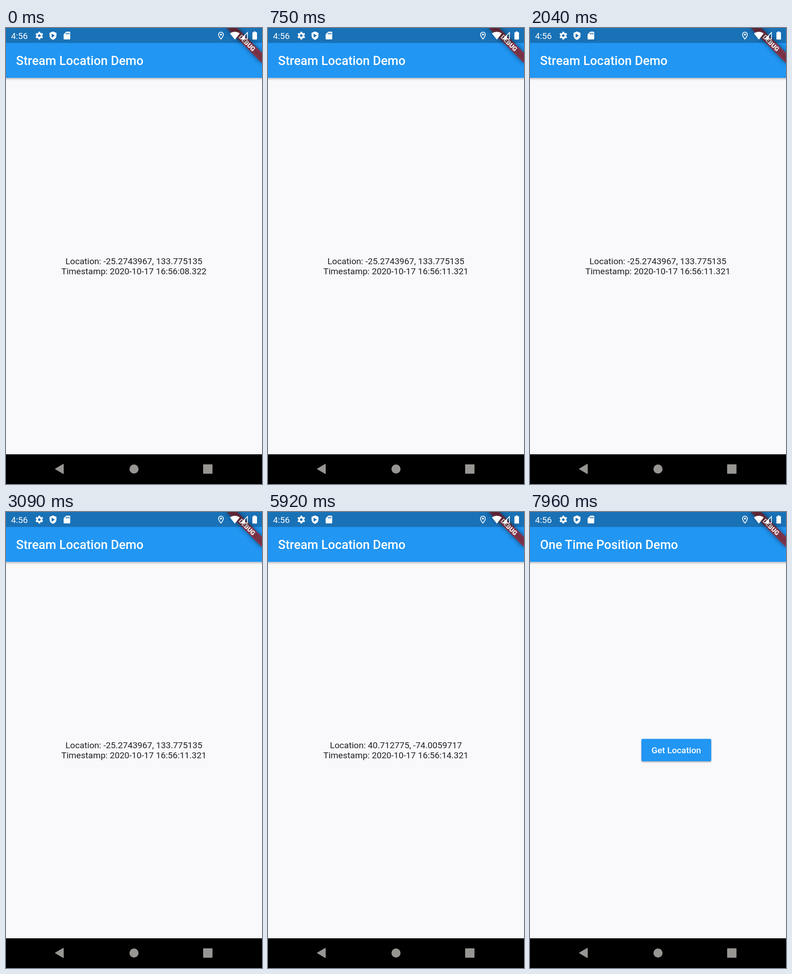
Write an HTML page that moves like this. It is 561 px wide and 998 px high and loops after 8000 ms.

```html
<!DOCTYPE html>
<html lang="en">
<head>
<meta charset="utf-8">
<title>Location demo</title>
<style>
  html, body { margin: 0; width: 100%; height: 100%; overflow: hidden; background: #f9f9fc; }
  svg { display: block; width: 561px; height: 998px; font-family: Roboto, sans-serif; }
  .body { font-size: 19.09px; fill: #212124; text-anchor: middle; }
  .title { font-size: 27.27px; font-weight: 500; fill: #fff; }
  .bar { filter: drop-shadow(0 2px 2.5px rgba(0, 0, 0, .3)); }
  .button { filter: drop-shadow(0 2px 1.5px rgba(0, 0, 0, .3)); }
</style>
</head>
<body>
<svg viewBox="0 0 561 998">
  <rect width="561" height="998" fill="#f9f9fc"/>

  <g id="pages">
    <g class="body">
      <text id="place" x="280.3" y="516.5"></text>
      <text id="stamp" x="280.3" y="538.5"></text>
    </g>
    <g transform="translate(561)">
      <rect class="button" x="204" y="496.5" width="153" height="49" rx="2.7" fill="#2196f3"/>
      <text class="body" x="280.5" y="527.5" style="fill:#fff;font-weight:500">Get Location</text>
    </g>
  </g>

  <rect class="bar" x="-10" y="-10" width="581" height="119" fill="#2196f3"/>
  <text id="title" class="title" x="22" y="81"></text>

  <!-- Corner ribbon -->
  <g transform="translate(561) rotate(45)">
    <rect x="-54.5" y="38.2" width="109" height="16.4" style="filter:blur(5.4px)" opacity=".5"/>
    <rect x="-54.5" y="38.2" width="109" height="16.4" fill="#b71c1c" fill-opacity=".63"/>
    <text y="51.3" font-size="13.9" font-weight="900" fill="#fff" text-anchor="middle">DEBUG</text>
  </g>

  <!-- Status bar -->
  <rect width="561" height="32.7" opacity=".25"/>
  <g fill="#fff">
    <text x="11" y="24" font-size="19.1">4:56</text>
    <g transform="translate(73 16.7) rotate(15)" fill="none" stroke="#fff">
      <circle r="4.7" stroke-width="3.8"/>
      <circle r="7.1" stroke-width="3" pathLength="12" stroke-dasharray="1 1"/>
    </g>
    <path fill-rule="evenodd" d="M103 7.5l7.6 3.2v5.6c0 4.6-3.2 8.3-7.6 9.7c-4.4-1.4-7.6-5.1-7.6-9.7v-5.6zM100 12.2v9l7-4.5z"/>
    <path fill-rule="evenodd" d="M132 8h7.2a1.5 1.5 0 0 1 1.5 1.5v14a1.5 1.5 0 0 1-1.5 1.5h-11.4a1.5 1.5 0 0 1-1.5-1.5v-9.8zM131.2 10.5v3.6h1.7v-3.6zM134.2 10.5v3.6h1.7v-3.6zM137.1 10.5v3.6h1.7v-3.6z"/>
    <path d="M471 24.2c-3-3.7-5.3-6.9-5.3-9.8a5.3 5.3 0 0 1 10.6 0c0 2.9-2.3 6.1-5.3 9.8z" fill="none" stroke="#fff" stroke-width="1.7"/>
    <circle cx="471" cy="14.4" r="2.1"/>
    <path d="M501.5 25.5L490.8 12a17.3 17.3 0 0 1 21.4 0z"/>
    <path fill-rule="evenodd" d="M530 8v17h-17zM528.4 12v11.4h-4.6v-6.8z"/>
    <path d="M543 7.5h4v1.7h2a1 1 0 0 1 1 1v14a1 1 0 0 1-1 1h-8a1 1 0 0 1-1-1v-14a1 1 0 0 1 1-1h2z"/>
  </g>

  <!-- Navigation bar -->
  <rect y="933" width="561" height="65"/>
  <g fill="#989693" stroke="#989693" stroke-width="2" stroke-linejoin="round">
    <path d="M108.5 965l17-10v20z"/>
    <circle cx="280.5" cy="965.3" r="9"/>
    <rect x="433" y="956" width="18.5" height="18.5"/>
  </g>
</svg>

<script>
  const LOOP = 8000;
  const SLIDE_START = 7624;

  const readings = [
    { at: 0, place: '-25.2743967, 133.775135', time: '08.322' },
    { at: 420, place: '-25.2743967, 133.775135', time: '11.321' },
    { at: 3420, place: '40.712775, -74.0059717', time: '14.321' },
    { at: 6420, place: '35.86166, 104.1953967', time: '17.321' },
  ];

  const byId = id => document.getElementById(id);
  const setText = (id, text) => {
    const node = byId(id);
    if (node.textContent !== text) node.textContent = text;
  };

  const slide = byId('pages').animate(
    [{ transform: 'translateX(0px)' }, { transform: 'translateX(-561px)' }],
    { delay: SLIDE_START, duration: 500, easing: 'ease', fill: 'both' }
  );
  slide.pause();

  const start = performance.now();

  function draw() {
    const t = (performance.now() - start) % LOOP;
    const reading = readings.filter(r => r.at <= t).pop();
    setText('place', `Location: ${reading.place}`);
    setText('stamp', `Timestamp: 2020-10-17 16:56:${reading.time}`);
    setText('title', t < SLIDE_START ? 'Stream Location Demo' : 'One Time Position Demo');
    slide.currentTime = t;
    requestAnimationFrame(draw);
  }
  draw();
</script>
</body>
</html>
```
